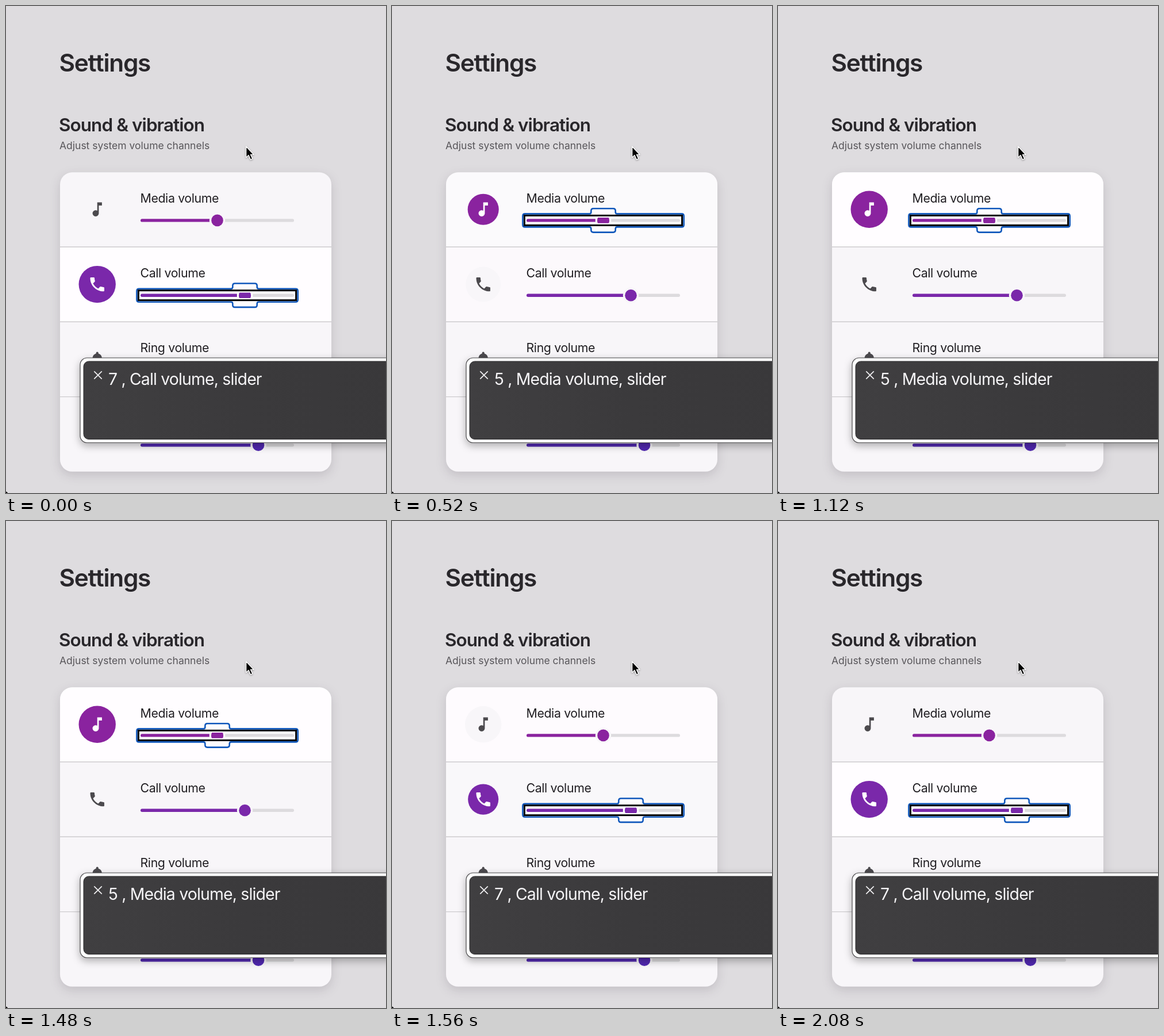
Animation, 661 px wide and 847 px high, one loop 2.12 s. Source, as an HTML page:

```html
<!DOCTYPE html>
<html lang="en">
<head>
<meta charset="utf-8">
<title>Settings</title>
<style>
  html, body { margin: 0; width: 100%; height: 100%; overflow: hidden; background: #dedcdf; }
  svg { display: block; width: 661px; height: 847px; }
  text { font-family: Inter, "Noto Sans", sans-serif; font-optical-sizing: none; fill: #201e22; }
  .title { font-size: 42.3px; font-weight: 600; letter-spacing: -.03em; fill: #29272b; }
  .heading { font-size: 31.5px; font-weight: 600; letter-spacing: -.03em; fill: #29272b; }
  .hint { font-size: 17.5px; fill: #58565a; }
  .label { font-size: 21.3px; letter-spacing: -.017em; }
  .speech { font-size: 28.4px; letter-spacing: -.029em; fill: #f6f5f7; }
  .card { filter: drop-shadow(0 6px 9px rgba(40, 30, 50, .15)); }
  .panel { filter: drop-shadow(0 5px 7px rgba(0, 0, 0, .3)); }
  .cursor { filter: drop-shadow(0 1.5px 1.5px rgba(0, 0, 0, .35)); }
</style>
</head>
<body>
<svg viewBox="0 0 661 847">
  <defs>
    <clipPath id="cardClip"><rect x="94" y="289.3" width="472" height="520.5" rx="21"/></clipPath>
    <linearGradient id="dark" x2="1" y2="0">
      <stop stop-color="#403f41"/><stop offset=".5" stop-color="#3b3a3c"/><stop offset="1" stop-color="#39383a"/>
    </linearGradient>
  </defs>
  <rect width="661" height="847" fill="#dedcdf"/>
  <text class="title" x="92.5" y="113.5">Settings</text>
  <text class="heading" x="92" y="218">Sound &amp; vibration</text>
  <text class="hint" x="93" y="248.7">Adjust system volume channels</text>

  <rect class="card" x="94" y="289.3" width="472" height="520.5" rx="21" fill="#f8f6f9"/>
  <g id="rows" clip-path="url(#cardClip)"></g>

  <g class="panel">
    <rect x="129" y="612" width="560" height="147.5" rx="12" fill="#fff" stroke="#4b4a4c" stroke-width="1.2"/>
  </g>
  <rect x="135" y="618" width="560" height="135.5" rx="9" fill="url(#dark)" stroke="#2d2c2e"/>
  <path d="M153.3 635.3l13.4 13.4m0-13.4l-13.4 13.4" stroke="#f0eff1" stroke-width="1.7" fill="none"/>
  <text id="speech" class="speech" x="178" y="659"></text>

  <path class="cursor" d="M417.6 244.2V263.6L422 259.6L425.4 267.2L428.8 265.7L425.5 258.4H431Z" fill="#000" stroke="#fff" stroke-width="1.4" stroke-linejoin="round"/>
  <path d="M0 844.5Q2.5 845 3 847H0Z" fill="#000"/>
</svg>
<script>
const LOOP = 2120;
const ROW_TOP = 289.3, PITCH = 130.3;
const IDLE = '#f8f6f9', ICON = '#4c4a4e';

const NOTE = 'M12 3v10.55c-.59-.34-1.27-.55-2-.55-2.21 0-4 1.79-4 4s1.79 4 4 4 4-1.79 4-4V7h4V3h-6z';
const PHONE = 'M6.62 10.79c1.44 2.83 3.76 5.14 6.59 6.59l2.2-2.2c.27-.27.67-.36 1.02-.24 1.12.37 2.33.57 3.57.57.55 0 1 .45 1 1V20c0 .55-.45 1-1 1-9.39 0-17-7.61-17-17 0-.55.45-1 1-1h3.5c.55 0 1 .45 1 1 0 1.25.2 2.45.57 3.57.11.35.03.74-.25 1.02l-2.2 2.2z';
const BELL = 'M18 16v-5c0-3.07-1.64-5.64-4.5-6.32V4c0-.83-.67-1.5-1.5-1.5s-1.5.67-1.5 1.5v.68C7.63 5.36 6 7.92 6 11v5l-2 2v1h16v-1z';

const channels = [
  { name: 'Media volume', icon: NOTE, color: '#8a239f', thumb: 367.5, speech: '5 , Media volume, slider' },
  { name: 'Call volume', icon: PHONE, color: '#7a28aa', thumb: 415.5, speech: '7 , Call volume, slider' },
  { name: 'Ring volume', icon: BELL },
  { color: '#5128b0', thumb: 439 }
];

// Focus moves: target row, row tint already reached, and starting radii
const moves = [
  { at: 520, row: 0, tint: .55, grow: 27, shrink: 30.6 },
  { at: 1560, row: 1, tint: .15, grow: 26.5, shrink: 31.8 }
];

function add(parent, tag, attrs, text) {
  const el = document.createElementNS('http://www.w3.org/2000/svg', tag);
  for (const key in attrs) el.setAttribute(key, attrs[key]);
  if (text) el.textContent = text;
  parent.append(el);
  return el;
}

function addTrack(parent, { thumb, color }, y) {
  const line = (x1, x2, stroke) => {
    add(parent, 'line', { x1, x2, y1: y, y2: y, stroke, 'stroke-width': 5.4, 'stroke-linecap': 'round' });
  };
  line(thumb, 498.3, '#dddbde');
  line(236.7, thumb, color);
}

function addThumb(parent, { thumb, color }, y) {
  add(parent, 'circle', { cx: thumb, cy: y, r: 13.7, fill: IDLE });
  add(parent, 'circle', { cx: thumb, cy: y, r: 10.3, fill: color });
}

function outline(cx, y) {
  const l = 227.4, r = 507.7, t = y - 11.5, b = y + 11.5;
  const x1 = cx - 21.2, x2 = cx + 21.2, top = y - 20.7, low = y + 20.7;
  return `M${l + 4} ${t}H${x1 - 3}q3 0 3-3V${top + 4}q0-4 4-4H${x2 - 4}q4 0 4 4V${t - 3}q0 3 3 3` +
    `H${r - 4}q4 0 4 4V${b - 4}q0 4-4 4H${x2 + 3}q-3 0-3 3V${low - 4}q0 4-4 4` +
    `H${x1 + 4}q-4 0-4-4V${b + 3}q0-3-3-3H${l + 4}q-4 0-4-4V${t + 4}q0-4 4-4Z`;
}

function addFocus(parent, channel, y, id) {
  const g = add(parent, 'g', {});
  const clip = add(g, 'clipPath', { id });
  add(clip, 'rect', { x: 232, y: y - 4.8, width: 271, height: 9.6 });
  add(g, 'path', { d: outline(channel.thumb, y), fill: '#fffdff', stroke: '#0f57bb', 'stroke-width': 2.6 });
  add(g, 'rect', { x: 230.4, y: y - 8.5, width: 274.2, height: 17, fill: '#fff', stroke: '#000', 'stroke-width': 3 });
  const inner = add(g, 'g', { 'clip-path': `url(#${id})` });
  addTrack(inner, channel, y);
  add(inner, 'rect', { x: channel.thumb - 13.7, y: y - 5, width: 27.4, height: 10, fill: '#fff' });
  add(inner, 'circle', { cx: channel.thumb, cy: y, r: 10.6, fill: channel.color });
  return g;
}

const rows = document.getElementById('rows');
const speech = document.getElementById('speech');

const views = channels.map((channel, i) => {
  const top = ROW_TOP + i * PITCH;
  const cy = top + 64.5, y = top + 83.6;
  const view = {};
  if (channel.speech) {
    view.tint = add(rows, 'rect', { x: 94, y: top, width: 472, height: PITCH, fill: '#fffdff' });
    view.disc = add(rows, 'circle', { cx: 158.7, cy });
  }
  if (channel.icon) {
    view.icon = add(rows, 'path', { d: channel.icon, fill: ICON, transform: `translate(142.4 ${cy - 16.3}) scale(1.36)` });
    add(rows, 'text', { class: 'label', x: 233.5, y: top + 52.4 }, channel.name);
  }
  if (channel.thumb) {
    view.plain = add(rows, 'g', {});
    addTrack(view.plain, channel, y);
    addThumb(view.plain, channel, y);
  }
  if (channel.speech) view.focus = addFocus(rows, channel, y, 'inside' + i);
  return view;
});

for (let i = 1; i < 4; i++) {
  const y = ROW_TOP + i * PITCH - .6;
  add(rows, 'line', { x1: 94, x2: 566, y1: y, y2: y, stroke: '#cdcbce', 'stroke-width': 1.4 });
}

function draw(time) {
  const move = time >= moves[0].at && time < moves[1].at ? moves[0] : moves[1];
  const dt = (time - move.at + LOOP) % LOOP;
  const tint = 1 - (1 - move.tint) * Math.exp(-dt / 70);
  const grow = 32.2 - (32.2 - move.grow) * Math.exp(-dt / 95);
  const shrink = move.shrink * Math.exp(-dt / 300);

  moves.forEach(({ row }) => {
    const { tint: wash, disc, icon, plain, focus } = views[row];
    const on = row === move.row;
    wash.setAttribute('opacity', on ? tint : 1 - tint);
    disc.setAttribute('r', on ? grow : shrink);
    disc.setAttribute('fill', on ? channels[row].color : IDLE);
    icon.setAttribute('fill', on ? '#fff' : ICON);
    plain.style.display = on ? 'none' : '';
    focus.style.display = on ? '' : 'none';
  });
  speech.textContent = channels[move.row].speech;
}

const start = performance.now();
function tick() {
  draw((performance.now() - start) % LOOP);
  requestAnimationFrame(tick);
}
tick();
</script>
</body>
</html>
```
